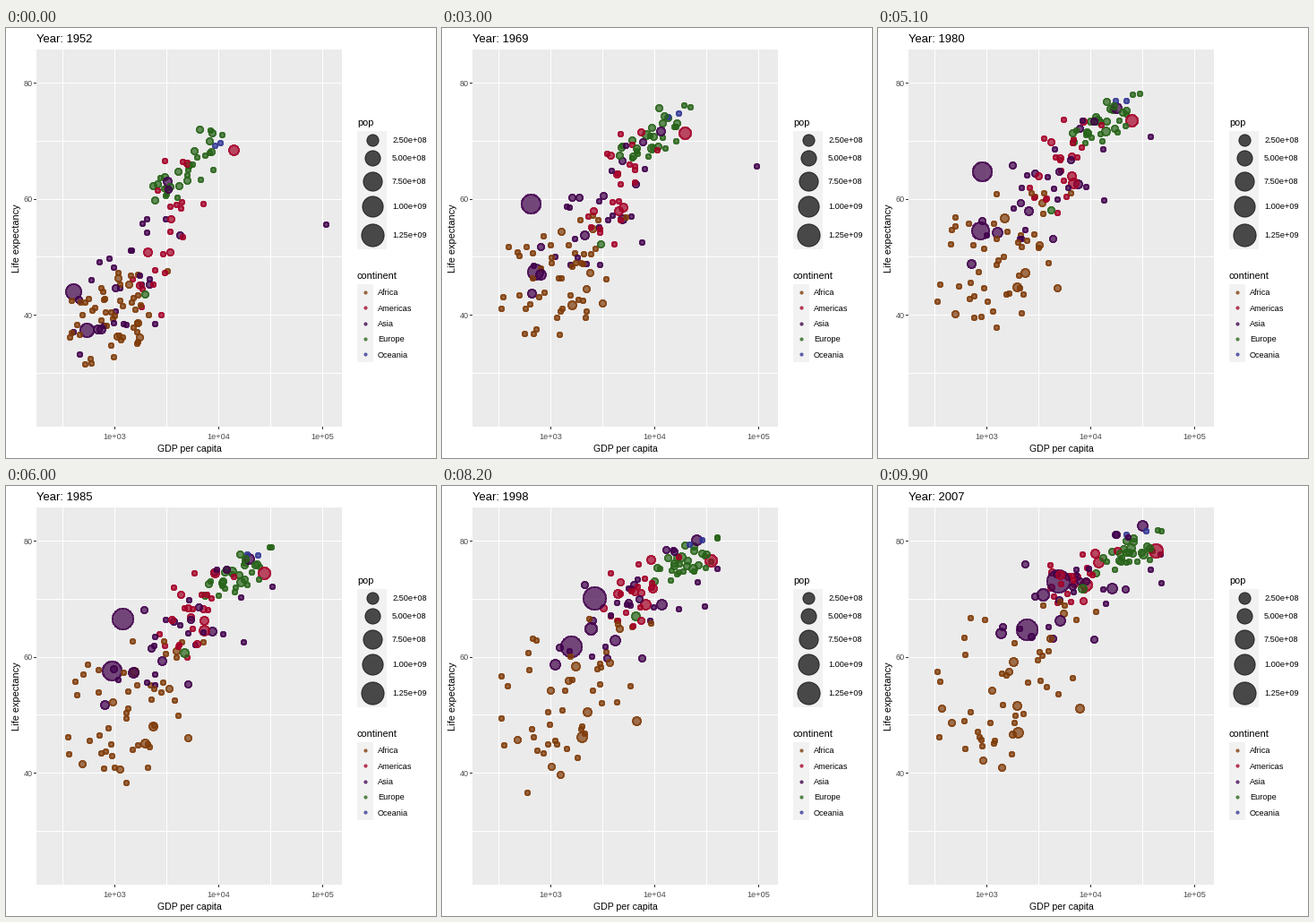
Recreate the animation shown at these times as a matplotlib script. Size 480 px wide and 480 px high, loop 10000 ms.

```python
import numpy as np
import matplotlib.pyplot as plt
from matplotlib.animation import FuncAnimation
from matplotlib.patches import Rectangle

SIZE, FRAMES, INTERVAL = 480, 100, 100
YEARS = np.arange(1952, 2008, 5)
COLORS = {"Africa": "#7F3B08", "Americas": "#A50026", "Asia": "#40004B",
          "Europe": "#276419", "Oceania": "#313695"}
COUNTS = {"Africa": 52, "Americas": 25, "Asia": 33, "Europe": 30, "Oceania": 2}
rng = np.random.default_rng(7)

# One entry per bubble: continent, x, y and radius at each survey year
bubbles = []


def to_x(log_gdp):
    return 121.2 + 116 * (np.asarray(log_gdp) - 3)


def to_y(life):
    return 191 - 6.487 * (np.asarray(life) - 60)


def point_radius(size):
    return 0.375 * (size * 2.845 + 0.945)


def pop_radius(millions):
    return point_radius(2 + 10 * np.sqrt(np.asarray(millions) / 1318.7))


def add(continent, pop, log_gdp, life):
    root = np.linspace(np.sqrt(pop[0]), np.sqrt(pop[1]), len(YEARS))
    bubbles.append((continent, to_x(log_gdp), to_y(life), pop_radius(root ** 2)))


def track(continent, pop, *points):
    """A bubble led through a few (year, gdp, life) points."""
    year, gdp, life = np.transpose(points)
    add(continent, pop, np.interp(YEARS, year, np.log10(gdp)), np.interp(YEARS, year, life))


def cloud(continent, corr, pop, growth, gdp, gdp_sd, life, life_sd):
    """Smaller countries that drift around their continent's trend."""
    t = np.linspace(0, 1, len(YEARS))
    gdp, gdp_sd, life, life_sd = (a + (b - a) * t ** 0.7
                                  for a, b in (gdp, gdp_sd, life, life_sd))
    turn = 0.75 * t
    known = sum(b[0] == continent for b in bubbles)
    for _ in range(COUNTS[continent] - known):
        a, b = rng.normal(size=(2, 2, 1))
        u, v = np.cos(turn) * a + np.sin(turn) * b
        v = corr * u + np.sqrt(1 - corr ** 2) * v
        u, v = np.clip(u, -1.7, 2.1), np.clip(v, -2, 1.6)
        x_noise, y_noise = rng.normal(size=(2, len(YEARS)))
        start = min(pop * np.exp(rng.normal(0, 0.9)), 45)
        add(continent, (start, start * growth),
            np.minimum(gdp + gdp_sd * u + 0.02 * x_noise, 4.68),
            np.minimum(life + life_sd * v + 0.25 * y_noise, 82))


# Large populations and outliers
track("Asia", (556, 1319), (1952, 400, 44), (1962, 488, 44.5), (1967, 613, 58.4),
      (1982, 962, 65.5), (2007, 4959, 73))
track("Asia", (372, 1110), (1952, 547, 37.4), (1987, 977, 58.6), (2007, 2452, 64.7))
track("Asia", (0.2, 2.5), (1952, 108382, 55.6), (1972, 95000, 67.7),
      (1982, 31354, 71.3), (2007, 47307, 77.6))
track("Asia", (86, 127), (1952, 3217, 63), (1972, 14779, 73.4), (2007, 31656, 82.6))
track("Asia", (82, 223), (1952, 750, 37.5), (1967, 762, 46), (2007, 3541, 70.7))
track("Asia", (47, 150), (1952, 684, 37.5), (1977, 660, 46.9), (2007, 1391, 64.1))
track("Americas", (158, 301), (1952, 13990, 68.4), (2007, 42952, 78.2))
track("Americas", (57, 190), (1952, 2109, 50.9), (1977, 6660, 61.5), (2007, 9066, 72.4))
track("Americas", (30, 109), (1952, 3478, 50.8), (2007, 11978, 76.2))
track("Africa", (33, 135), (1952, 1077, 36.3), (1977, 1982, 44.5), (2007, 2014, 46.9))
track("Africa", (2.5, 8.9), (1952, 493, 40), (1987, 848, 44), (1992, 737, 23.6),
      (1997, 590, 36.1), (2007, 863, 46.2))
track("Europe", (22, 71), (1952, 1969, 43.6), (2007, 8458, 71.8))

cloud("Africa", 0.45, 2.8, 3, (2.98, 3.22), (0.24, 0.4), (39.5, 55.5), (4.8, 8.5))
cloud("Americas", 0.6, 3.5, 2.7, (3.49, 3.87), (0.17, 0.2), (53.5, 73.5), (8, 2.8))
cloud("Asia", 0.6, 5, 3, (3.2, 3.95), (0.34, 0.46), (47.5, 72), (8.5, 5.5))
cloud("Europe", 0.85, 9, 1.25, (3.72, 4.4), (0.22, 0.19), (65.8, 78.2), (3.8, 2.2))
cloud("Oceania", 0.5, 4, 2.2, (4.01, 4.47), (0.01, 0.06), (69.2, 80.7), (0.1, 0.5))

bubbles = [bubbles[i] for i in rng.permutation(len(bubbles))]
tracks = np.array([b[1:] for b in bubbles])

# The axes use pixels, with y pointing down
plt.rcParams["font.family"] = "Liberation Sans"
fig = plt.figure(figsize=(SIZE / 72, SIZE / 72), dpi=72, facecolor="white")
ax = fig.add_axes([0, 0, 1, 1])
ax.set(xlim=(0, SIZE), ylim=(SIZE, 0))
ax.axis("off")


def box(x0, y0, x1, y1, color):
    ax.add_patch(Rectangle((x0, y0), x1 - x0, y1 - y0, fc=color, lw=0, zorder=0))


def hline(y, x0, x1, color):
    box(x0, np.floor(y), x1, np.floor(y) + 1, color)


def vline(x, y0, y1, color):
    box(np.floor(x), y0, np.floor(x) + 1, y1, color)


def label(x, y, text, size=9.1, color="black", **kw):
    return ax.text(x, y, text, fontsize=size, color=color, **kw)


def on_pixels(x, y):
    return np.floor(np.column_stack([x, y])) + 0.5


def areas(r):
    """Marker areas for whole-pixel radii with the outline inside."""
    return (2 * (np.round(r) - 0.4)) ** 2


def dots(x, y, r, color):
    return ax.scatter(*on_pixels(x, y).T, s=areas(r), c=color, alpha=0.7,
                      linewidths=1, antialiaseds=False, zorder=3)


LEFT, TOP, RIGHT, BOTTOM = 34, 24, 375, 445
box(LEFT, TOP, RIGHT, BOTTOM, "#EBEBEB")
for power in np.arange(2.5, 5.1, 0.5):
    vline(to_x(power), TOP, BOTTOM, "white")
for life in range(30, 81, 10):
    hline(to_y(life), LEFT, RIGHT, "white")
for power in (3, 4, 5):
    vline(to_x(power), BOTTOM, BOTTOM + 3, "#333333")
    label(to_x(power), 459, f"1e+{power:02d}", color="#4D4D4D", ha="center")
for life in (40, 60, 80):
    hline(to_y(life), LEFT - 3, LEFT, "#333333")
    label(29.5, to_y(life) + 3.4, str(life), color="#4D4D4D", ha="right")

title = label(34, 16.5, "", 13)
label(204.5, 473, "GDP per capita", 10.5, ha="center")
label(15, 234.5, "Life expectancy", 11, rotation=90, rotation_mode="anchor", ha="center")

label(392, 109, "pop", 11)
box(392, 115, 425, 247, "#F2F2F2")
for pop, y in zip((250, 500, 750, 1000, 1250), (124, 144, 170, 198, 230)):
    dots([408], [y], pop_radius([pop]), "black")
    label(431, y + 4.5, f"{pop * 1e6:.2e}")

label(392, 280, "continent", 11)
box(392, 286, 409.5, 372.5, "#F2F2F2")
for k, (name, color) in enumerate(COLORS.items()):
    y = 294.7 + 17.28 * k
    dots([400.6], [y], [point_radius(1.5)], color)
    label(415, y + 3.8, name)

points = dots(*tracks[:, :, 0].T, [COLORS[b[0]] for b in bubbles])


def draw(i):
    t = i / (FRAMES - 1)
    pos = t * (len(YEARS) - 1)
    k = min(int(pos), len(YEARS) - 2)
    x, y, r = (tracks[..., k] * (k + 1 - pos) + tracks[..., k + 1] * (pos - k)).T
    points.set_offsets(on_pixels(x, y))
    points.set_sizes(areas(r))
    title.set_text(f"Year: {round(1952 + 55 * t)}")
    return points, title


anim = FuncAnimation(fig, draw, frames=FRAMES, interval=INTERVAL, repeat=True, repeat_delay=0)
plt.show()
```
